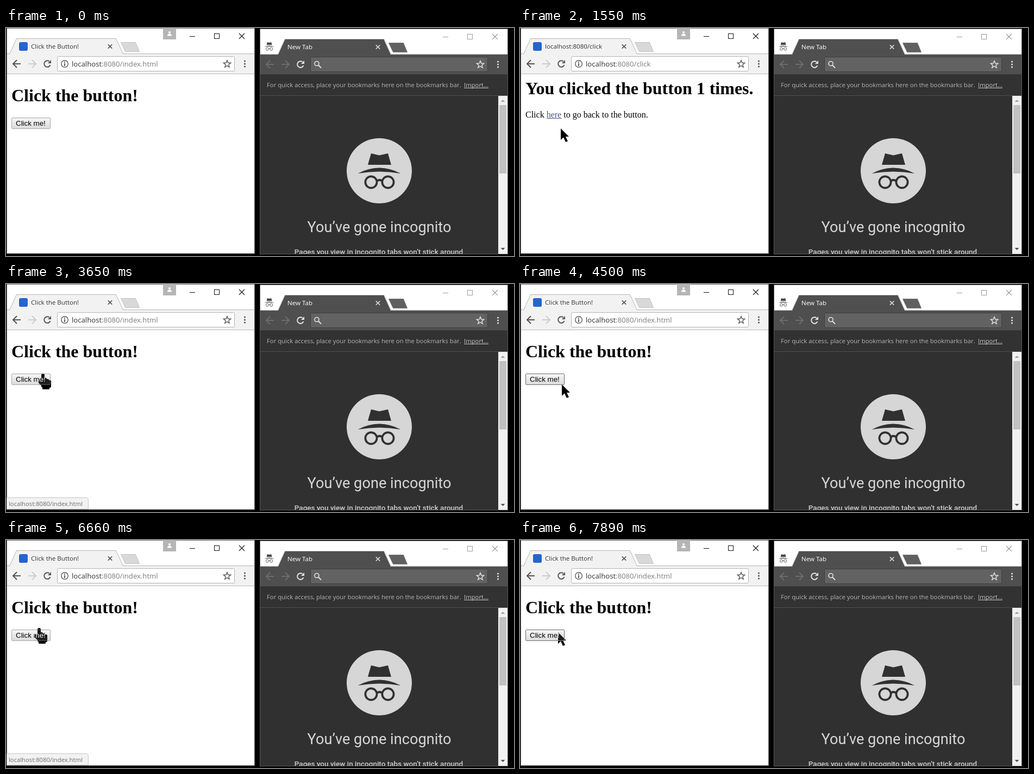
An HTML page with a canvas that plays this animation: 935x420 px, repeating every 8000 ms.

```html
<!DOCTYPE html>
<html lang="en">
<head>
<meta charset="utf-8">
<title>Button counter</title>
<style>
html, body { margin: 0; width: 100%; height: 100%; overflow: hidden; background: #000; }
canvas { display: block; width: 935px; height: 420px; }
</style>
</head>
<body>
<canvas id="stage" width="935" height="420"></canvas>
<script>
const W = 935, H = 420, LOOP = 8000, TICK = 77.4;
const UI = 'px "Open Sans", "Noto Sans", sans-serif';
const SERIF = 'px "Liberation Serif", serif';
const SANS = 'px "Liberation Sans", sans-serif';
const ROBOTO = 'px Roboto, sans-serif';

const LIGHT = {
  border: '#6b6b6b', bar: '#f2f2f2', edge: '#b5b5b5', base: '#b9b9b9', newTab: '#d9d9d9', newEdge: '#c2c2c2',
  icon: '#555', off: '#cdcdcd', close: '#5a5a5a', controls: '#111', field: '#fff', fieldEdge: '#b3b3b3'
};
const DARK = {
  border: '#5a5a5a', bar: '#4f4f4f', edge: '#b5b5b5', base: '#3c3c3c', newTab: '#606060', newEdge: '#777',
  icon: '#e4e4e4', off: '#6d6d6d', close: '#d2d2d2', controls: '#999', field: '#626262', fieldEdge: '#3d3d3d'
};

const stage = document.getElementById('stage').getContext('2d');
let c = stage;

function rect(x, y, w, h, fill) {
  c.fillStyle = fill;
  c.fillRect(x, y, w, h);
}

function trace(points) {
  c.beginPath();
  points.forEach(([x, y]) => c.lineTo(x, y));
}

function fill(color) {
  c.fillStyle = color;
  c.fill();
}

function stroke(color, width = 1) {
  c.strokeStyle = color;
  c.lineWidth = width;
  c.stroke();
}

function poly(points, color) {
  trace(points);
  fill(color);
}

function line(points, color, width) {
  trace(points);
  stroke(color, width);
}

function box(x, y, w, h, r, color, edge) {
  c.beginPath();
  c.roundRect(x + .5, y + .5, w - 1, h - 1, r);
  fill(color);
  stroke(edge);
}

function arc(x, y, r, from = 0, to = 7) {
  c.beginPath();
  c.arc(x, y, r, from, to);
}

function ring(x, y, r, color, width) {
  arc(x, y, r);
  stroke(color, width);
}

function dot(x, y, r, color) {
  arc(x, y, r);
  fill(color);
}

function text(str, x, y, font, color) {
  c.font = font;
  c.fillStyle = color;
  c.fillText(str, x, y);
  return x + c.measureText(str).width;
}

function cross(x, y, r, color, width) {
  for (const s of [-r, r]) line([[x - r, y - s], [x + r, y + s]], color, width);
}

function arrow(x, y, dir, color) {
  line([[x - 7 * dir, y], [x + 6 * dir, y]], color, 2);
  line([[x, y - 7], [x + 7 * dir, y], [x, y + 7]], color, 2);
}

function reload(x, y, color) {
  arc(x, y, 5.8, .35, 5.4);
  stroke(color, 2);
  poly([[x + 7, y - 7], [x + 7, y - 1], [x + 1, y - 1]], color);
}

function star(x, y, color) {
  trace(Array.from({ length: 10 }, (_, i) => {
    const a = (i / 5 - .5) * Math.PI, r = i % 2 ? 3 : 7;
    return [x + r * Math.cos(a), y + .5 + r * Math.sin(a)];
  }));
  c.closePath();
  stroke(color, 1.4);
}

function windowFrame(k, tab1, tab2) {
  rect(1, 0, 457, 416, k.border);
  rect(2, 1, 455, 414, '#fff');
  rect(2, 47, 455, 1, k.edge);
  rect(2, 48, 455, 36, k.bar);
  rect(2, 84, 455, 1, k.base);

  trace([[tab1, 48], [tab1 + 13, 19.5], [tab2 - 13, 19.5], [tab2, 48]]);
  fill(k.bar);
  stroke(k.edge);
  cross(tab2 - 24, 34, 3.7, k.close, 1.7);
  trace([[tab2 - 4, 26.5], [tab2 + 23, 26.5], [tab2 + 30, 43.5], [tab2 + 4, 43.5]]);
  c.closePath();
  fill(k.newTab);
  stroke(k.newEdge);

  rect(338, 15, 10, 1, k.controls);
  c.strokeStyle = k.controls;
  c.strokeRect(383.5, 10.5, 9, 9);
  cross(434, 15, 5, k.controls, 1.1);

  arrow(20, 66, -1, k.icon === LIGHT.icon ? k.icon : k.off);
  arrow(48, 66, 1, k.off);
  reload(76, 66, k.icon);
  box(94, 52, 327, 28, 2, k.field, k.fieldEdge);
  star(407, 66, k.icon);
  for (const y of [61, 66, 71]) dot(439.5, y, 1.6, k.icon);
}

function leftWindow() {
  windowFrame(LIGHT, 6.5, 215.5);
  box(24, 26, 16, 16, 2, '#2563d0', '#2563d0');
  rect(289, 0, 24, 21, '#b5b5b5');
  dot(301, 8, 2.1, '#fff');
  arc(301, 14.5, 4, Math.PI, 0);
  fill('#fff');
  ring(108, 66, 6.3, '#5c5c5c', 1.4);
  rect(107, 65, 2, 5, '#5c5c5c');
  rect(107, 62, 2, 2, '#5c5c5c');
}

function bow(x, y, w, rise, back) {
  c.beginPath();
  c.moveTo(x - w, y);
  c.quadraticCurveTo(x, y - 2 * rise, x + w, y);
  if (back) c.quadraticCurveTo(x, y - 2 * back, x - w, y);
}

function hatAndGlasses(x, y, scale, color) {
  c.save();
  c.translate(x, y);
  c.scale(scale, scale);
  poly([[-21, -11], [-15, -32], [0, -28.5], [16, -32], [22, -11]], color);
  bow(0, 5, 39.5, 10.5, 3.5);
  fill(color);
  for (const lens of [-15, 16]) ring(lens, 21, 10.6, color, 3.7);
  bow(.5, 19, 5.5, 2);
  stroke(color, 3.7);
  c.restore();
}

function rightWindow() {
  c.save();
  c.translate(466, 1);
  windowFrame(DARK, 34.5, 242.5);
  c.restore();
  hatAndGlasses(484.5, 33.7, .235, '#444');
  text('New Tab', 518, 39, 11.6 + UI, '#fff');
  ring(572, 65.5, 4, DARK.icon, 1.6);
  line([[575, 68.5], [580, 73.5]], DARK.icon, 2);

  rect(468, 86, 455, 38, '#323232');
  rect(468, 124, 455, 1, '#505050');
  rect(468, 125, 438, 291, '#303030');
  text('For quick access, place your bookmarks here on the bookmarks bar.', 480, 109, 11.3 + UI, '#b5b5b5');
  const end = text('Import...', 843, 109, 11.3 + UI, '#c4c4c4');
  rect(843, 110, end - 843, 1, '#c4c4c4');

  rect(906, 125, 17, 291, '#f1f1f1');
  rect(908, 142, 13, 126, '#c1c1c1');
  poly([[910.5, 136], [914.5, 132], [918.5, 136]], '#a3a3a3');
  poly([[910.5, 405], [914.5, 409], [918.5, 405]], '#505050');

  dot(687, 263, 60, '#d6d6d6');
  hatAndGlasses(687, 263, 1, '#303030');
  c.save();
  c.beginPath();
  c.rect(468, 125, 438, 291);
  c.clip();
  c.textAlign = 'center';
  text('You’ve gone incognito', 687, 376, 27.2 + ROBOTO, '#d8d8d8');
  text('Pages you view in incognito tabs won’t stick around', 686, 417, '500 13.5' + ROBOTO, '#d0d0d0');
  c.restore();
}

function button(hover, pressed) {
  const shade = c.createLinearGradient(0, 165, 0, 186);
  shade.addColorStop(pressed ? 1 : 0, '#f7f7f7');
  shade.addColorStop(pressed ? 0 : 1, '#dadada');
  box(10, 165, 72, 21, 1, shade, hover ? '#6a6a6a' : '#a6a6a6');
  text('Click me!', 18, 180, 13.33 + SANS, '#000');
}

function address(path, title) {
  text(title, 46, 38, 11.55 + UI, '#333');
  const x = text('localhost', 121, 71, 13.15 + UI, '#333');
  text(':8080' + path, x, 71, 13.15 + UI, '#7c7c7c');
}

function startPage(hover, pressed) {
  address('/index.html', 'Click the Button!');
  text('Click the button!', 10, 135, 'bold 32' + SERIF, '#000');
  button(hover, pressed);
}

function countPage(count) {
  const font = 16 + SERIF, link = '#4b5286';
  address('/click', 'localhost:8080/click');
  text(`You clicked the button ${count} times.`, 10, 122, 'bold 32' + SERIF, '#000');
  const from = text('Click ', 10, 165, font, '#000');
  const to = text('here', from, 165, font, link);
  rect(Math.round(from), 166, Math.round(to - from), 1, link);
  text(' to go back to the button.', to, 165, font, '#000');
}

function status(alpha) {
  c.globalAlpha = alpha;
  box(1, 393, 151, 22, [0, 4, 0, 0], '#f2f2f2', '#c6c6c6');
  text('localhost:8080/index.html', 5, 409, 11.25 + UI, '#6b6b6b');
  c.globalAlpha = 1;
}

// every click swaps the start page and the counter page
const CLICKS = [1385, 3480, 4870, 6490];

// pointer strokes: start, end, target x, target y, depth of the swing below the straight path
const STROKES = [
  [70, 760, 75, 185, 0],
  [1950, 2480, 90, 177, 140],
  [2700, 3010, 68, 165, 0],
  [3870, 4480, 77, 185, 90],
  [4950, 5570, 92, 192, 85],
  [5655, 5880, 61, 162, 0],
  [6860, 7870, 70, 170, 80]
];

function pointer(t) {
  let x = 127, y = 385, hand = false;
  for (const [start, end, tx, ty, depth] of STROKES) {
    if (t < start) break;
    const u = Math.min(1, (t - start) / (end - start));
    const ease = u * u * (3 - 2 * u), swing = depth * Math.sin(Math.PI * u);
    x += (tx - x) * ease + swing * .45;
    y += (ty - y) * ease + swing;
    hand = u === 1 && ty < 168;
  }
  return { x: Math.round(x), y: Math.round(y), hand, shown: t >= STROKES[0][0] };
}

function arrowPath() {
  trace([[0, 0], [0, 21], [5, 16.5], [9, 25], [13, 23.5], [9, 15.3], [15, 15]]);
}

function handPath() {
  c.beginPath();
  c.roundRect(-3, 0, 6, 20, 3);
  for (let i = 0; i < 3; i++) c.roundRect(2 + 4 * i, 8 + 2 * i, 5, 14, 2);
  c.roundRect(-3, 13, 18, 13, 3);
  c.roundRect(-1, 20, 13, 9, 1);
  c.ellipse(-4, 17, 7, 3.2, .9, 0, 7);
}

// the pointer inverts what lies under it
function drawPointer({ x, y, hand }) {
  c.save();
  c.globalCompositeOperation = 'difference';
  c.translate(x, y);
  hand ? handPath() : arrowPath();
  fill('#fff');
  c.restore();
}

const backdrop = document.createElement('canvas');
backdrop.width = W;
backdrop.height = H;
c = backdrop.getContext('2d');
rect(0, 0, W, H, '#000');
leftWindow();
rightWindow();
c = stage;

function draw(time) {
  // the screen updates in even ticks
  const t = Math.floor((time + 10) / TICK) * TICK;
  const p = pointer(t);
  const clicks = CLICKS.filter(at => at <= t).length;
  const hover = p.shown && !p.hand && p.x < 82 && p.y >= 165 && p.y <= 186;
  const pressed = CLICKS.some(at => t < at && t > at - 90);

  c.drawImage(backdrop, 0, 0);
  if (clicks % 2) countPage((clicks + 1) / 2);
  else startPage(hover, hover && pressed);
  if (p.hand) status(1);
  else if (pointer(t - 150).hand) status(.5);
  if (p.shown) drawPointer(p);
}

const begin = performance.now();
(function frame() {
  draw((performance.now() - begin) % LOOP);
  requestAnimationFrame(frame);
})();
</script>
</body>
</html>
```
